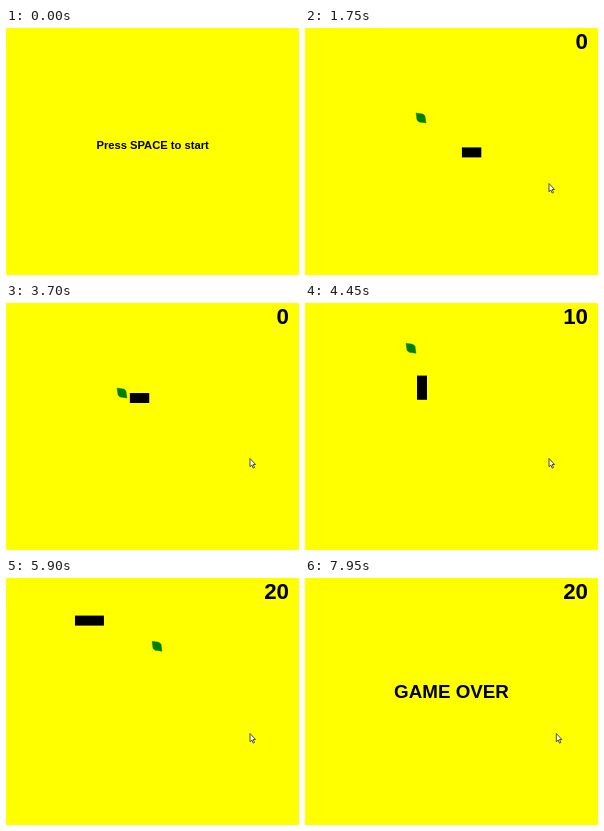
An HTML page for the animation above (8 s loop, 293 by 247 pixels).

```html
<!DOCTYPE html>
<html lang="en">
<head>
<meta charset="utf-8">
<title>Caterpillar</title>
<style>
  html, body { margin: 0; width: 100%; height: 100%; overflow: hidden; background: #ff0; }
  svg { display: block; width: 293px; height: 247px; }
  text { font-family: "Liberation Sans", Arial, sans-serif; font-weight: bold; }
</style>
</head>
<body>
<svg viewBox="0 0 293 247">
  <rect width="293" height="247" fill="#ff0"/>
  <text id="start" x="146.6" y="121.4" font-size="11.2" text-anchor="middle">Press SPACE to start</text>
  <text id="over" x="146.5" y="119.8" font-size="18.8" text-anchor="middle">GAME OVER</text>
  <text id="score" x="283" y="21" font-size="22.3" text-anchor="end">0</text>
  <path id="leaf" d="M0 0L1 7L3 9L10 10L9 3L7 1Z" fill="green" stroke="green" stroke-width=".4"/>
  <rect id="snake"/>
  <path id="cursor" d="M0 0V8.2L1.9 6.5L3.2 9.6L4.5 9L3.2 6H5.6Z" fill="#fff" stroke="#222" stroke-width=".8"/>
</svg>
<script>
const LOOP = 8000, STEP = 50, THICK = 10;
const START = 800, SCORE = 1000, MOVE = 1200, OVER = 6700;
const EAT = [4200, 5350], GROW = [4300, 5550];
const LEAVES = [[111, 85], [101, 40.3], [146, 63.3]];

// time, x, y
const SNAKE = [
  [START, 146.5, 124.4], [MOVE, 146.5, 124.4], [1870, 171, 124.4],
  [2680, 171, 95], [4150, 117, 95], [4200, 117, 93], [4300, 117, 93],
  [5210, 117, 42.6], [5350, 110, 42.6], [5550, 110, 42.6],
  [5930, 81.2, 42.6], [OVER, 81.2, -15]
];
const UP = [[1870, 2680], [4150, 5210], [5930, OVER]];
const CURSOR = [[400, 266, 158], [600, 244, 155.5], [7750, 244, 155.5], [7950, 251.3, 155.5]];

const $ = id => document.getElementById(id);
const show = (id, on) => $(id).setAttribute("visibility", on ? "visible" : "hidden");
const place = (id, [x, y]) => $(id).setAttribute("transform", `translate(${x} ${y})`);

function along(path, t) {
  const i = path.findIndex(p => p[0] > t);
  if (i < 0) return path[path.length - 1].slice(1);
  if (i === 0) return path[0].slice(1);
  const [a, b] = [path[i - 1], path[i]];
  const k = (t - a[0]) / (b[0] - a[0]);
  return [1, 2].map(n => a[n] + (b[n] - a[n]) * k);
}

function draw(t) {
  const eaten = GROW.filter(g => t >= g).length;
  const placing = EAT.some((e, i) => t >= e && t < GROW[i]);
  const playing = t >= START && t < OVER;

  show("start", t < START);
  show("over", t >= OVER);
  show("score", t >= SCORE);
  $("score").textContent = eaten * 10;

  show("leaf", t >= MOVE && t < OVER && !placing);
  place("leaf", LEAVES[eaten]);

  const length = 19.4 + eaten * 4.8;
  const up = UP.some(([a, b]) => t >= a && t < b);
  const [w, h] = up ? [THICK, length] : [length, THICK];
  const [x, y] = along(SNAKE, t);
  show("snake", playing);
  $("snake").setAttribute("width", w);
  $("snake").setAttribute("height", h);
  place("snake", [x - w / 2, y - h / 2]);

  show("cursor", t >= 400);
  place("cursor", along(CURSOR, t));
}

const t0 = performance.now();
function frame() {
  const t = (performance.now() - t0) % LOOP;
  draw(Math.floor(t / STEP) * STEP);
  requestAnimationFrame(frame);
}
frame();
</script>
</body>
</html>
```
